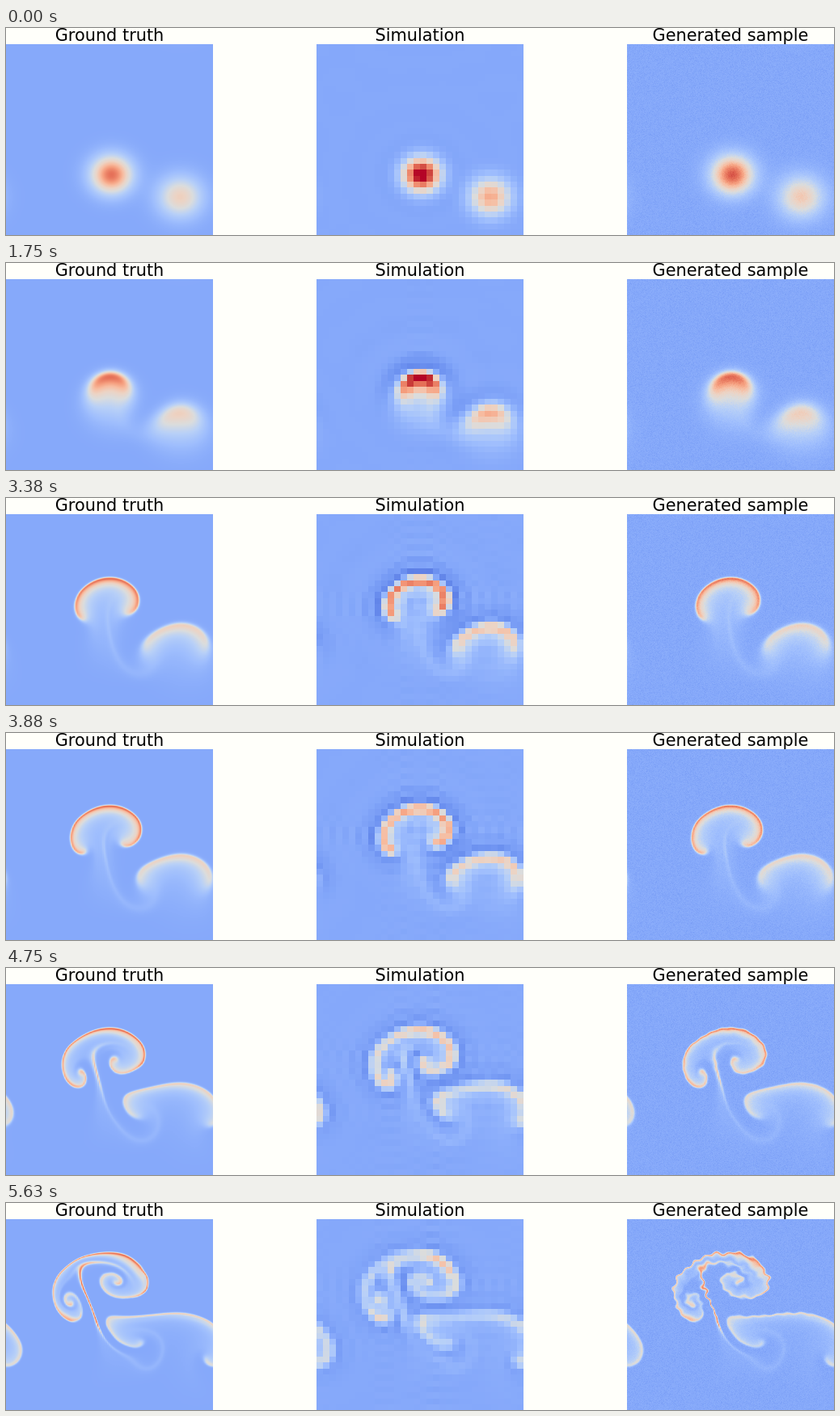
These frames come from a looping animation (1024 px wide and 256 px high, 5760 ms). An HTML page with a canvas:

```html
<!DOCTYPE html>
<html lang="en">
<head>
<meta charset="utf-8">
<title>Rising plumes</title>
<style>
  html, body { margin: 0; width: 100%; height: 100%; overflow: hidden; background: #fffffa; }
  canvas, svg { position: absolute; left: 0; top: 0; width: 1024px; height: 256px; display: block; }
  text { font: 20.83px "DejaVu Sans", sans-serif; text-anchor: middle; fill: #000; }
</style>
</head>
<body>
<canvas id="stage" width="1024" height="256"></canvas>
<svg viewBox="0 0 1024 256">
  <text x="128" y="16">Ground truth</text>
  <text x="512" y="16">Simulation</text>
  <text x="896" y="16">Generated sample</text>
</svg>
<script>
const start = performance.now();
const LOOP = 5760, FRAMES = 46;
const N = 128, MASK = N - 1, CELLS = N * N;
const W = 256, H = 236, TOP = 20;
const BUOYANCY = 36, LEVEL = 0.4;

// Warm blobs in grid cells: centre, radius, strength
const BLOBS = [
  { x: 65, y: 87.3, r: 8.9, amp: 0.85 },
  { x: 107.5, y: 102.2, r: 9.8, amp: 0.52 }
];
// Height of the leading edge over time: [ms, cells]
const FRONT = [[0, 76.4], [500, 74.9], [1000, 70.6], [1750, 61.6], [2500, 52.1],
  [3380, 41.8], [4250, 33.6], [4750, 28.7], [5760, 20.5]];
// Colour stops: value, r, g, b
const STOPS = [
  [-0.2, 79, 110, 219], [-0.08, 108, 145, 240], [0, 134, 169, 250], [0.12, 159, 190, 253],
  [0.25, 184, 208, 247], [0.38, 218, 220, 221], [0.5, 236, 211, 196], [0.62, 247, 188, 160],
  [0.72, 245, 158, 126], [0.85, 229, 112, 88], [1, 196, 48, 50], [1.08, 180, 4, 38], [1.2, 180, 4, 38]
];

const clamp = (v, lo, hi) => Math.max(lo, Math.min(hi, v));
const field = () => new Float32Array(CELLS);

// Piecewise linear lookup in rows of [key, values...]
function lookup(rows, key, col) {
  let i = 1;
  while (i < rows.length - 1 && rows[i][0] < key) i++;
  const a = rows[i - 1], b = rows[i];
  return a[col] + (b[col] - a[col]) * clamp((key - a[0]) / (b[0] - a[0]), 0, 1);
}

const SHADES = 512;
const palette = Array.from({ length: SHADES }, (_, i) => {
  const v = -0.2 + 1.4 * i / (SHADES - 1);
  const [r, g, b] = [1, 2, 3].map(c => Math.round(lookup(STOPS, v, c)));
  return (255 << 24 | b << 16 | g << 8 | r) >>> 0;
});
const shade = v => palette[clamp((v + 0.2) / 1.4 * (SHADES - 1), 0, SHADES - 1) | 0];

function heat(x, y) {
  let sum = 0;
  for (const b of BLOBS) {
    let dx = x - b.x, dy = y - b.y;
    dx -= N * Math.round(dx / N);
    dy -= N * Math.round(dy / N);
    sum += b.amp * Math.exp(-(dx * dx + dy * dy) / (2 * b.r * b.r));
  }
  return sum;
}

// ---- Fourier transform ----
const cosT = [], sinT = [], flip = [];
for (let i = 0; i < N; i++) {
  cosT[i] = Math.cos(2 * Math.PI * i / N);
  sinT[i] = -Math.sin(2 * Math.PI * i / N);
  let r = 0;
  for (let b = 1, k = i; b < N; b *= 2, k >>= 1) r = r * 2 + (k & 1);
  flip[i] = r;
}

function fftLine(re, im, off, stride) {
  for (let i = 0; i < N; i++) {
    const j = flip[i];
    if (j <= i) continue;
    const p = off + i * stride, q = off + j * stride;
    let t = re[p]; re[p] = re[q]; re[q] = t;
    t = im[p]; im[p] = im[q]; im[q] = t;
  }
  for (let half = 1; half < N; half *= 2) {
    const turn = N / (2 * half);
    for (let base = 0; base < N; base += 2 * half) {
      for (let k = 0; k < half; k++) {
        const c = cosT[k * turn], s = sinT[k * turn];
        const p = off + (base + k) * stride, q = p + half * stride;
        const tr = re[q] * c - im[q] * s, ti = re[q] * s + im[q] * c;
        re[q] = re[p] - tr; im[q] = im[p] - ti;
        re[p] += tr; im[p] += ti;
      }
    }
  }
}

function fft(re, im) {
  for (let i = 0; i < N; i++) fftLine(re, im, i * N, 1);
  for (let i = 0; i < N; i++) fftLine(re, im, i, N);
}

const wave = i => i < N / 2 ? i : i - N;

// Calls fn(index, kx, ky) for every Fourier mode
function eachMode(fn) {
  for (let j = 0; j < N; j++)
    for (let i = 0; i < N; i++) fn(j * N + i, wave(i), wave(j));
}

// ---- Flow: vorticity plus a backward displacement map ----
let spin = field(), shiftX = field(), shiftY = field();
let velX = field(), velY = field();
const temp = field();

function lerpAt(f, x, y) {
  const i = Math.floor(x), j = Math.floor(y), a = x - i, b = y - j;
  const i0 = i & MASK, i1 = (i + 1) & MASK, j0 = (j & MASK) * N, j1 = ((j + 1) & MASK) * N;
  const up = f[j0 + i0] + (f[j0 + i1] - f[j0 + i0]) * a;
  const down = f[j1 + i0] + (f[j1 + i1] - f[j1 + i0]) * a;
  return up + (down - up) * b;
}

function cubicWeights(t, w) {
  const t2 = t * t, t3 = t2 * t;
  w[0] = (-t3 + 2 * t2 - t) / 2;
  w[1] = (3 * t3 - 5 * t2 + 2) / 2;
  w[2] = (-3 * t3 + 4 * t2 + t) / 2;
  w[3] = (t3 - t2) / 2;
}

function updateHeat() {
  for (let j = 0, p = 0; j < N; j++)
    for (let i = 0; i < N; i++, p++) temp[p] = heat(i - shiftX[p], j - shiftY[p]);
}

function solveVelocity() {
  const re = Float32Array.from(spin), im = field();
  const unit = 2 * Math.PI / N;
  fft(re, im);
  eachMode((p, kx, ky) => {
    const k2 = kx * kx + ky * ky;
    if (!k2 || kx === -N / 2 || ky === -N / 2) { re[p] = im[p] = 0; return; }
    const s = 1 / (unit * k2 * CELLS), a = re[p] * s, b = im[p] * s;
    re[p] = kx * a - ky * b;
    im[p] = kx * b + ky * a;
  });
  fft(im, re);
  velX = re;
  velY = im;
}

function advance(dt) {
  const spin2 = field(), x2 = field(), y2 = field(), wx = [0, 0, 0, 0], wy = [0, 0, 0, 0];
  for (let j = 0, p = 0; j < N; j++) {
    for (let i = 0; i < N; i++, p++) {
      const mx = i - velX[p] * dt / 2, my = j - velY[p] * dt / 2;
      const x = i - lerpAt(velX, mx, my) * dt, y = j - lerpAt(velY, mx, my) * dt;
      const ix = Math.floor(x), iy = Math.floor(y);
      cubicWeights(x - ix, wx);
      cubicWeights(y - iy, wy);
      let s = 0, sx = 0, sy = 0;
      for (let b = 0; b < 4; b++) {
        const row = ((iy + b - 1) & MASK) * N;
        for (let a = 0; a < 4; a++) {
          const q = row + ((ix + a - 1) & MASK), w = wx[a] * wy[b];
          s += w * spin[q];
          sx += w * shiftX[q];
          sy += w * shiftY[q];
        }
      }
      spin2[p] = s;
      x2[p] = i - x + sx;
      y2[p] = j - y + sy;
    }
  }
  spin = spin2; shiftX = x2; shiftY = y2;
  updateHeat();
  for (let j = 0, p = 0; j < N; j++)
    for (let i = 0; i < N; i++, p++) {
      const slope = (temp[j * N + ((i + 1) & MASK)] - temp[j * N + ((i - 1) & MASK)]) / 2;
      spin[p] -= BUOYANCY * dt * slope;
    }
  solveVelocity();
}

// Topmost point of the warm contour and its upward speed
function findFront() {
  for (let j = 1; j < N; j++) {
    let best = null;
    for (let i = 0; i < N; i++) {
      const now = temp[j * N + i], above = temp[(j - 1) * N + i];
      if (now <= LEVEL) continue;
      const y = j - 1 + (LEVEL - above) / (now - above);
      if (!best || y < best.y) best = { y, speed: -lerpAt(velY, i, y) };
    }
    if (best) return best;
  }
  return { y: 0, speed: 0 };
}

const frames = [];

function addFrame() {
  if (!frames.length) {
    updateHeat();
  } else {
    const target = lookup(FRONT, frames.length * 125, 1);
    for (let n = 0; n < 8; n++) {
      const front = findFront(), gap = front.y - target;
      if (gap < 0.05) break;
      advance(front.speed > 0.01 ? clamp(gap / front.speed, 0.004, 0.065) : 0.05);
    }
  }
  frames.push({ x: shiftX, y: shiftY, coarse: coarsen(frames.length / (FRAMES - 1)) });
}

// Band-limited 32 by 32 version, with overshoot at sharp edges
function coarsen(age) {
  const re = Float32Array.from(temp), im = field(), out = new Float32Array(1024);
  const sharpen = 1 - 0.6 * age;
  fft(re, im);
  eachMode((p, kx, ky) => {
    const k2 = kx * kx + ky * ky;
    const keep = Math.abs(kx) < 16 && Math.abs(ky) < 16;
    const gain = keep ? (1 + sharpen * Math.min(k2 * 0.0386, 1)) * Math.exp(-age * k2 / 250) / CELLS : 0;
    re[p] *= gain;
    im[p] *= gain;
  });
  fft(im, re);
  for (let j = 0; j < 32; j++)
    for (let i = 0; i < 32; i++) out[j * 32 + i] = re[(j * 4 + 2) * N + i * 4 + 2];
  return out;
}

// ---- Drawing ----
const ctx = document.getElementById("stage").getContext("2d");

function drawPanel(left, value) {
  const img = ctx.createImageData(W, H), px = new Uint32Array(img.data.buffer);
  for (let y = 0, p = 0; y < H; y++)
    for (let x = 0; x < W; x++, p++) px[p] = shade(value(x, y));
  ctx.putImageData(img, left, TOP);
}

function randomFrom(seed) {
  return () => (seed = (Math.imul(seed, 1664525) + 1013904223) >>> 0) / 4294967296;
}

function draw(n) {
  const f = frames[n], age = n / (FRAMES - 1), rand = randomFrom(n * 7919 + 17);
  const at = (x, y) => heat(x - lerpAt(f.x, x, y), y - lerpAt(f.y, x, y));
  drawPanel(0, (x, y) => at(x / 2, y * N / H));
  drawPanel(384, (x, y) => f.coarse[Math.floor(y * 32 / H) * 32 + (x >> 3)]);
  // The sampled panel is noisy, and its upper plume grows ragged with age
  drawPanel(768, (x, y) => {
    const gx = x / 2, gy = y * N / H;
    const wobble = 0.6 * age ** 8 * clamp((70 - gy) / 15, 0, 1);
    const wx = wobble * (Math.sin(gy * 0.9 + gx * 0.37) + Math.sin(gx * 0.71 - gy * 0.53));
    const wy = wobble * (Math.sin(gx * 0.83 - gy * 0.29) + Math.sin(gy * 0.61 + gx * 0.47));
    return at(gx + wx, gy + wy) * (1.07 - 0.15 * age) + (rand() + rand() - 1) * 0.035;
  });
}

function frameAt(t) {
  const k = Math.min(FRAMES - 1, Math.floor(t / 125));
  return k % 2 && t < k * 125 + 5 ? k - 1 : k;
}

let shown = -1;

function tick() {
  const n = frameAt((performance.now() - start) % LOOP);
  while (frames.length <= n) addFrame();
  if (n !== shown) draw(shown = n);
  if (frames.length < FRAMES) addFrame();
  requestAnimationFrame(tick);
}
tick();
</script>
</body>
</html>
```
